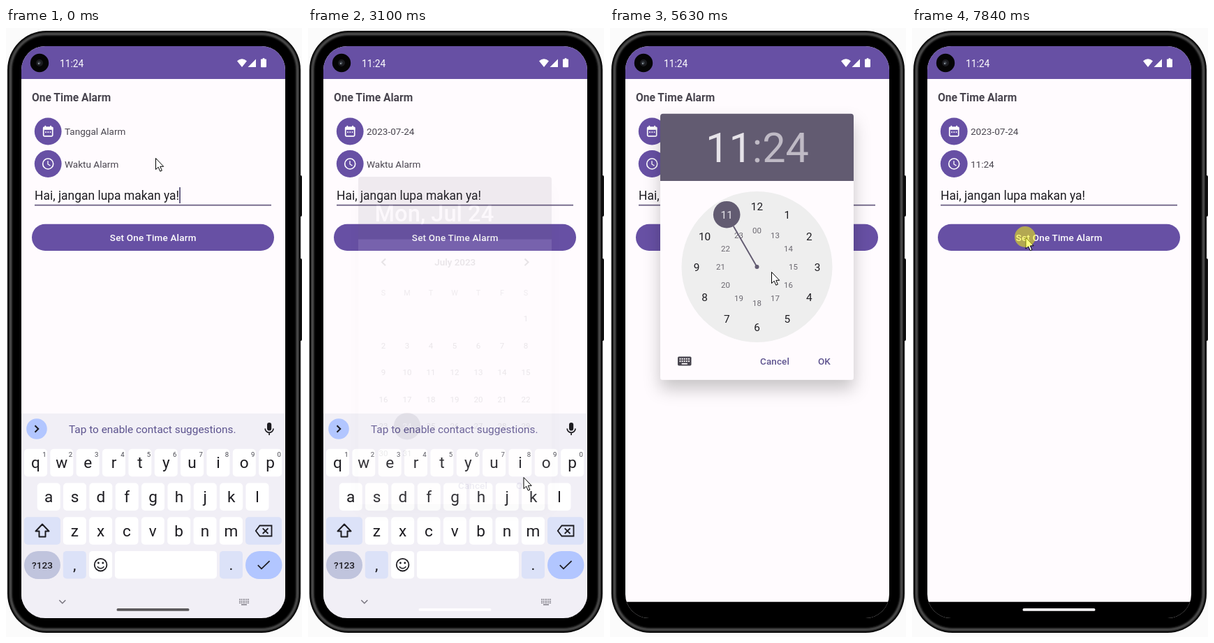
An HTML page that plays this animation: 424x872 px, repeating every 7990 ms.

```html
<!DOCTYPE html>
<html lang="id">
<head>
<meta charset="utf-8">
<title>One Time Alarm</title>
<style>
html, body { margin: 0; width: 100%; height: 100%; overflow: hidden; background: #fbfbfb; }
svg { display: block; width: 100vw; height: 100vh; }
text { font-family: Roboto, "Noto Sans", sans-serif; white-space: pre; }
</style>
</head>
<body>
<svg id="stage" viewBox="0 0 424 872"></svg>
<script>
const LOOP = 7990;
const PURPLE = '#6750a4', SLATE = '#625b71', PAPER = '#fffbfe';
const KEY_TINT = '#dce2f8', KEY_BLUE = '#b2c6ff', INK = '#1d1c21';

const rect = (x, y, w, h, fill, r = 0, more = '') =>
  `<rect x="${x}" y="${y}" width="${w}" height="${h}" rx="${r}" fill="${fill}" ${more}/>`;
const circle = (x, y, r, fill, more = '') =>
  `<circle cx="${x}" cy="${y}" r="${r}" fill="${fill}" ${more}/>`;
const line = (d, color, width = 2, more = '') =>
  `<path d="${d}" fill="none" stroke="${color}" stroke-width="${width}" ${more}/>`;
const text = (s, x, y, size, fill, more = '') =>
  `<text x="${x}" y="${y}" font-size="${size}" fill="${fill}" ${more}>${s}</text>`;
const mid = 'text-anchor="middle"';
const bold = mid + ' font-weight="500"';
const repeat = (n, make) => Array.from({ length: n }, (_, i) => make(i)).join('');

function phone() {
  // Nested rounded bodies whose grey rises and falls form the metal rim.
  const rim = repeat(9, i => {
    const inset = 2 + i, grey = 4 + Math.round(70 * Math.sin(Math.PI * i / 8) ** 2);
    return rect(inset, inset + 2, 424 - 2 * inset, 866 - 2 * inset, `rgb(${grey},${grey},${grey})`, 56 - i);
  });
  return rect(419, 211, 5, 59, '#161616', 2) + rect(419, 330, 5, 118, '#161616', 2) + rim +
    rect(11, 13, 402, 844, '#000', 46);
}

function statusBar() {
  return rect(22, 26, 378, 47, PURPLE) +
    circle(48, 50, 13.2, '#050505') + circle(48, 50, 5, '#1b1c20') +
    circle(47.5, 50, 2.3, '#3c4147') + circle(46.8, 51, 1, '#9aa3ab') +
    text('11:24', 77, 56, 13.8, '#fff') +
    '<path d="M331 47.2Q338 41.5 345 47.2L338 56ZM346.5 56H358V44.5Z" fill="#fff"/>' +
    rect(365, 44.5, 8, 11.7, '#fff', .9) + rect(367.7, 43.2, 2.6, 2, '#fff');
}

function app() {
  const calendar = rect(53.7, 142.2, 13, 12.6, 'none', 1.2, 'stroke="#fff" stroke-width="1.7"') +
    rect(53, 142, 14.4, 3.8, '#fff') + rect(55.5, 139.8, 1.7, 3, '#fff') + rect(63.2, 139.8, 1.7, 3, '#fff') +
    repeat(3, i => rect(56.2 + i * 3.2, 148.2, 1.7, 1.7, '#fff'));
  return text('One Time Alarm', 37, 105, 15.6, '#49454f', 'font-weight="700"') +
    circle(60.2, 148, 19.4, PURPLE) + calendar + circle(60.2, 148, 19.4, '#fff', 'id="dateRipple"') +
    text('', 84, 153, 13.55, '#49454f', 'id="date"') +
    circle(60.2, 194.5, 19.4, PURPLE) +
    circle(60.2, 194.5, 7.5, 'none', 'stroke="#fff" stroke-width="1.6"') +
    line('M60 190.2V195L63.5 197.1', '#fff', 1.3) + circle(60.2, 194.5, 19.4, '#fff', 'id="timeRipple"') +
    text('', 84, 200, 13.55, '#49454f', 'id="time"') +
    text('Hai, jangan lupa makan ya!', 41, 246, 17.45, INK) +
    rect(41, 252.8, 339, 1.7, '#675b80') +
    rect(248.2, 228, 1.7, 23, '#4f4672', 0, 'id="caret"') +
    rect(37, 280.7, 347, 38.3, PURPLE, 19.1) +
    text('Set One Time Alarm', 210.7, 305, 13.46, '#fff', bold + ' letter-spacing=".2"');
}

function keyboardIcon(x, y, w) {
  const dots = repeat(10, i =>
    rect(x + w * (.13 + i % 5 * .16), y + w * (.12 + (i > 4) * .17), w * .1, w * .1, PAPER));
  return rect(x, y, w, w * .67, '#49454f', w * .09) + dots + rect(x + w * .29, y + w * .48, w * .42, w * .09, PAPER);
}

function keyboard() {
  const pitch = 37.35, rowTop = r => 602.8 + r * 48.7;
  const key = (x, r, w, fill, label = '', size = 22.6) =>
    rect(x, rowTop(r), w, 39.5, fill, 5) + text(label, x + w / 2, rowTop(r) + 27.3, size, INK, mid);
  const row = (letters, x, r) => repeat(letters.length, i => key(x + i * pitch, r, 33, '#fff', letters[i]));
  const icons =
    circle(44, 574, 14.8, KEY_BLUE) + line('M41.5 569.2L46.3 574L41.5 578.8', INK) +
    rect(374, 565, 6.2, 11.6, INK, 3.1) + line('M371.2 573.5a5.9 5.9 0 0 0 11.8 0M377.1 579v4', INK, 1.7) +
    line('M52 710.5L61.5 720.5H56.5V728.5H47.5V720.5H42.5Z', INK, 2, 'stroke-linejoin="round"') +
    line('M363.5 712.5H380.5V727.5H363.5L357.8 720ZM367.7 716.3L375.5 724M375.5 716.3L367.7 724', INK, 1.8) +
    circle(135.6, 768.7, 8.8, 'none', `stroke="${INK}" stroke-width="1.8"`) +
    circle(132.4, 766, 1.4, INK) + circle(138.8, 766, 1.4, INK) + line('M131 771a5 4.4 0 0 0 9.2 0', INK, 1.6) +
    line('M360.8 769.2L366 774.3L377.6 763.2', INK, 1.8) +
    line('M76.3 819.3L80.8 823.8L85.3 819.3', '#77747e', 1.5);
  const grid = repeat(18, i => rect(334 + i % 6 * 2.5, 817.5 + Math.floor(i / 6) * 2.5, 1.5, 1.5, '#77747e'));
  return rect(22, 552, 378, 300, '#f1eff6') +
    text('Tap to enable contact suggestions.', 90, 580, 15.4, '#5c538e') +
    row('qwertyuiop', 26, 0) + row('asdfghjkl', 44.7, 1) + row('zxcvbnm', 81.8, 2) +
    repeat(10, i => text((i + 1) % 10, 55 + i * pitch, 613.6, 9.6, '#46464f', mid)) +
    key(26, 2, 52, KEY_TINT) + key(343, 2, 52, KEY_TINT) +
    key(81.8, 3, 33, KEY_TINT, ',') + key(119.1, 3, 33, '#fff') +
    key(156, 3, 146, '#fff') + key(306, 3, 33, KEY_TINT, '.') +
    rect(26, 749, 52, 40, '#c0c4dd', 20) + text('?123', 52, 774, 13.6, INK, bold) +
    rect(343, 749, 52.5, 40, KEY_BLUE, 20) +
    icons + grid + rect(337, 825, 8, 1.4, '#77747e');
}

const panel = (y, h, head) =>
  rect(72, y, 277, h, PAPER, 4, 'filter="url(#shadow)"') +
  `<path d="M72 ${y + head}V${y + 4}a4 4 0 0 1 4-4H345a4 4 0 0 1 4 4V${y + head}Z" fill="${SLATE}"/>`;
const actions = y => text('Cancel', 236, y, 13.46, '#5f5490', bold + ' letter-spacing=".1"') +
  text('OK', 306.8, y, 13.46, '#5f5490', bold);

function dateDialog() {
  const weekdays = repeat(7, i => text('SMTWTFS'[i], 108 + i * 34, 383, 10.8, '#6b6870', mid));
  const days = repeat(31, i => {
    const cell = i + 6;
    return text(i + 1, 108 + cell % 7 * 34, 420 + Math.floor(cell / 7) * 38.5, 11.5,
      i === 23 ? '#ebe8ed' : '#3d3a42', mid);
  });
  return panel(213, 469, 89.5) +
    text('2023', 95.5, 243, 15.4, '#c5c1ca', 'font-weight="500"') +
    text('Mon, Jul 24', 95.5, 277, 32.7, '#ebe8ed', 'font-weight="500"') +
    text('July 2023', 210.8, 340, 13.46, '#2b2930', bold) +
    line('M111 330.5L106 335.3L111 340.1M310.5 330.5L315.5 335.3L310.5 340.1', INK) +
    circle(142, 570.2, 19.2, SLATE) + weekdays + days + actions(660);
}

function timeDialog() {
  const cx = 210.5, cy = 342;
  const hours = repeat(12, i => {
    const h = i + 1, a = h * Math.PI / 6, dx = Math.sin(a), dy = -Math.cos(a);
    return text(h, cx + dx * 86.5, cy + dy * 86.5 + 5.5, 15.4, h === 11 ? '#e6e3e9' : INK, mid) +
      text(h === 12 ? '00' : h + 12, cx + dx * 52, cy + dy * 52 + 4.1, 11.5, '#6b6870', mid);
  });
  return panel(122.7, 381, 96.3) +
    text('11<tspan fill="#bfbac5">:24</tspan>', 211, 192.3, 59.4, '#e6e3e9', mid) +
    circle(cx, cy, 108, '#eeeeee') + circle(167.2, 267.2, 19.3, SLATE) + hours +
    line('M210.5 342L176.8 283.8', SLATE, 1.9) + circle(cx, cy, 3, SLATE) +
    keyboardIcon(97, 470.5, 19.5) + actions(482);
}

const stage = document.getElementById('stage');
stage.innerHTML = `<defs>
  <filter id="shadow" x="-20%" y="-20%" width="140%" height="145%">
    <feDropShadow dx="0" dy="13" stdDeviation="11.5" flood-color="#000" flood-opacity=".22"/></filter>
  <clipPath id="screen">${rect(22, 26, 378, 819, '#000', 34)}</clipPath></defs>
  ${phone()}
  <g clip-path="url(#screen)">
    ${rect(22, 26, 378, 819, PAPER)}${statusBar()}${app()}
    ${rect(22, 821.7, 378, 24, '#000')}
    <g id="keys">${keyboard()}</g>
    ${rect(158.5, 831, 104, 3.8, '#fff', 1.9, 'id="pill"')}
    <g id="dateDialog">${dateDialog()}</g><g id="timeDialog">${timeDialog()}</g>
  </g>
  <path id="mouse" d="M.5.5V16.6L4.2 13.2 6.8 19.2 9.4 18.1 6.8 12.3H11.7Z" fill="#fff" stroke="#000"/>
  ${circle(-.5, -.5, 15, '#ff0', 'id="click" fill-opacity=".5"')}`;

const el = {};
stage.querySelectorAll('[id]').forEach(n => el[n.id] = n);

const ramp = (t, a, b) => Math.min(1, Math.max(0, (t - a) / (b - a)));
const ease = k => k * k * (3 - 2 * k);
const pulse = (t, a, b) => Math.sin(Math.PI * ramp(t, a, b));
const between = (t, a, b) => t >= a && t < b;
const blink = t => Math.floor(t / 500) % 2 === 0;
const show = (node, alpha) => {
  node.setAttribute('opacity', alpha);
  node.style.display = alpha > 0 ? '' : 'none';
};
const place = (node, x, y) => node.setAttribute('transform', `translate(${x} ${y})`);

// Each move: start time, end time, where the pointer comes to rest.
const MOVES = [
  [70, 600, 61, 146], [1350, 1680, 183, 237], [1680, 2080, 274, 559], [2110, 2570, 308.5, 643],
  [3100, 3850, 64, 204], [5340, 5630, 231, 349], [5630, 6090, 322, 552], [6100, 6290, 309.5, 611],
  [6700, 7200, 291, 400], [7220, 7580, 162.5, 299.5]];
const CLICKS = [[745, 1050], [2705, 3095], [3905, 4105], [6435, 6620], [7720, LOOP]];

function pointer(t) {
  let x = 214, y = 186;
  for (const [a, b, toX, toY] of MOVES) {
    const k = ease(ramp(t, a, b));
    x += (toX - x) * k;
    y += (toY - y) * k;
  }
  return [x, y];
}

function caretOn(t) {
  if (t < 1350) return blink(t + 100);
  return between(t, 4300, 6900) || t >= 3300 && blink(t - 3300);
}

function draw(t) {
  const [x, y] = pointer(t);
  place(el.mouse, x, y);
  place(el.click, x, y);
  show(el.click, CLICKS.some(([a, b]) => between(t, a, b)) ? 1 : 0);
  show(el.caret, caretOn(t) ? 1 : 0);
  show(el.dateRipple, .2 * pulse(t, 750, 1210));
  show(el.timeRipple, .2 * pulse(t, 4250, 4600));

  const gone = ease(ramp(t, 5350, 5560));
  place(el.keys, 0, gone * 300);
  show(el.keys, gone < 1 ? 1 : 0);

  const light = ramp(t, 1480, 1900) - ramp(t, 4300, 4800) + .7 * ramp(t, 5400, 5500) + .3 * ramp(t, 7240, 7500);
  const grey = Math.round(92 + 163 * light);
  el.pill.setAttribute('fill', `rgb(${grey},${grey - 2},${grey})`);
  show(el.pill, t < 5400 ? 1 : ramp(t, 6100, 6280));

  show(el.dateDialog, t < 3095 ? ramp(t, 1345, 1480) : .1 * (t < 3160));
  show(el.timeDialog, ramp(t, 4900, 5062) - ramp(t, 6700, 6830));
  place(el.timeDialog, 0, 134 * ease(ramp(t, 5720, 5980)));

  el.date.textContent = t < 3095 ? 'Tanggal Alarm' : '2023-07-24';
  el.time.textContent = t < 6700 ? 'Waktu Alarm' : '11:24';
}

const start = performance.now();
function tick() {
  draw((performance.now() - start) % LOOP);
  requestAnimationFrame(tick);
}
tick();
</script>
</body>
</html>
```
